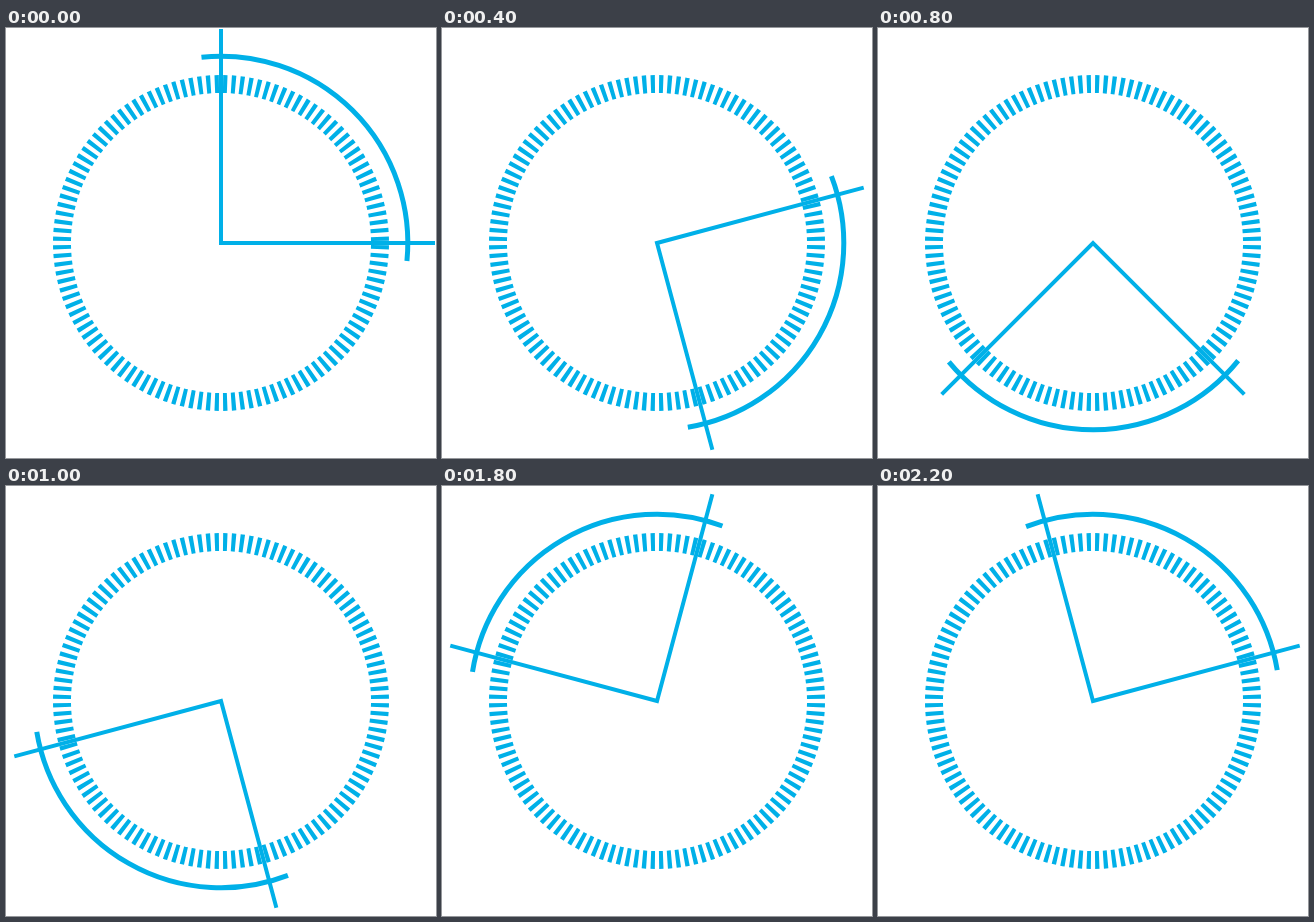
An HTML page that plays this animation: 430 by 430 pixels, repeating every 2.3 s.

```html
<!DOCTYPE html>
<html lang="en">
<head>
<meta charset="utf-8">
<title>Rotating quadrant</title>
<style>
  html, body { margin: 0; width: 100%; height: 100%; overflow: hidden; background: #fff; }
  svg { display: block; width: 100vw; height: 100vh; }
</style>
</head>
<body>
<svg viewBox="0 0 430 430" fill="none" stroke="#00b0e8">
  <circle cx="215" cy="215" r="159" stroke-width="18"
          pathLength="240" stroke-dasharray="1 1" stroke-dashoffset="-0.5"/>
  <g id="quadrant">
    <path d="M215 1V215H429" stroke-width="4"/>
    <path id="arc" stroke-width="5"/>
  </g>
</svg>
<script>
  const CENTER = 215, RADIUS = 186.8;
  const STEP_MS = 100, STEPS = 23, STEP_DEG = 15;
  const quadrant = document.getElementById('quadrant');

  // Degrees run clockwise from the top.
  function point(deg) {
    const a = deg * Math.PI / 180;
    return `${CENTER + RADIUS * Math.sin(a)} ${CENTER - RADIUS * Math.cos(a)}`;
  }

  document.getElementById('arc').setAttribute('d',
    `M${point(-6)}A${RADIUS} ${RADIUS} 0 0 1 ${point(95.5)}`);

  function render(ms) {
    const step = Math.floor(ms / STEP_MS) % STEPS;
    // The first move is a double step, so 23 steps make a full turn.
    const angle = step ? (step + 1) * STEP_DEG : 0;
    quadrant.setAttribute('transform', `rotate(${angle} ${CENTER} ${CENTER})`);
  }

  const start = performance.now();
  function tick() {
    render(performance.now() - start);
    requestAnimationFrame(tick);
  }
  tick();
</script>
</body>
</html>
```
